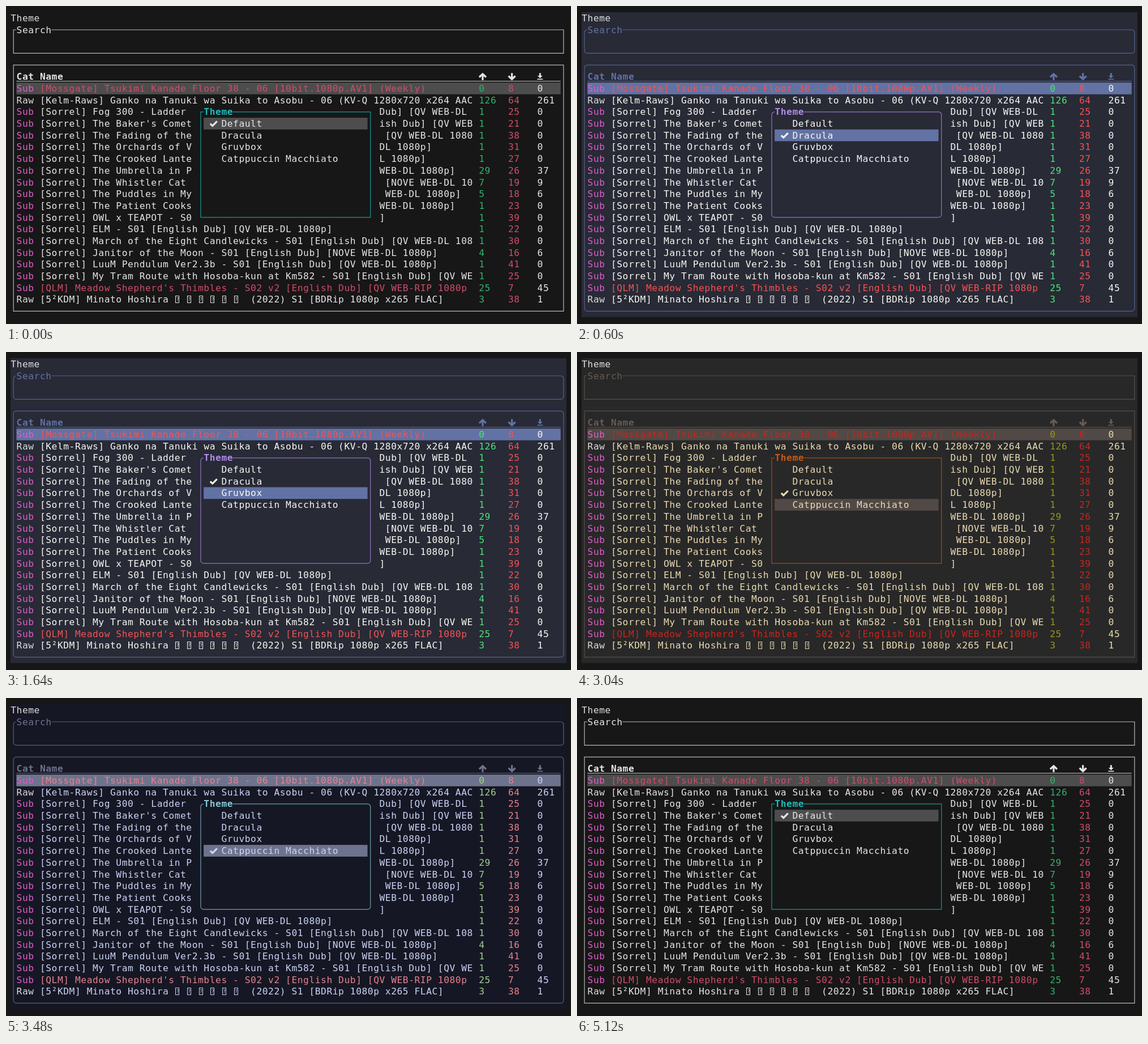
An HTML page with a canvas for the animation above (5.64 s loop, 998x561 px).

```html
<!DOCTYPE html>
<html lang="en">
<head>
<meta charset="utf-8">
<title>Theme</title>
<style>
  html, body { margin: 0; width: 100%; height: 100%; overflow: hidden; background: #171717; }
  canvas { display: block; width: 998px; height: 561px; }
</style>
</head>
<body>
<canvas id="stage" width="998" height="561"></canvas>
<script>
const ctx = document.getElementById('stage').getContext('2d');

// Terminal grid
const LEFT = 8, TOP = 11, CELL_W = 10.337, CELL_H = 20.68, COLS = 95, ROWS = 26;
const FONT = '16.3px "DejaVu Sans Mono", "Noto Sans Mono", monospace';
const LINE_ALPHA = 0.78;
const PAGE = '#171717', PLAIN = '#dddddd', SUB = '#e05ccb';

const THEMES = [
  { name: 'Default', bg: PAGE, fg: '#e6e6e6', border: '#e6e6e6', focus: '#1cbcbc',
    mark: '#4d4d4d', red: '#d04c6b', green: '#31b36d', radius: 0 },
  { name: 'Dracula', bg: '#282a36', fg: '#f8f8f2', border: '#6272a4', focus: '#b08be8',
    mark: '#6272a4', red: '#f55353', green: '#4be576', radius: 5 },
  { name: 'Gruvbox', bg: '#282828', fg: '#ebdbb2', border: '#665c54', focus: '#c9590f',
    mark: '#504945', red: '#cc241d', green: '#98971a', radius: 0 },
  { name: 'Catppuccin Macchiato', bg: '#161724', fg: '#cad3f5', border: '#6e738d', focus: '#84c8d6',
    mark: '#6e738d', red: '#e5828f', green: '#a0d090', radius: 5 },
];

// [start in ms, active theme, highlighted menu entry]
const LOOP = 5640;
const STEPS = [
  [0, 0, 0], [120, 0, 1], [600, 1, 1], [1640, 1, 2], [2080, 2, 2],
  [3040, 2, 3], [3480, 3, 3], [4680, 3, 0], [5120, 0, 0],
];

const NAME_COLS = 74;
const dub = (title, site = 'QV') => `[Sorrel] ${title} - S01 [English Dub] [${site} WEB-DL 1080p]`;
// A name whose middle lies behind the menu
const behind = (start, end) => `[Sorrel] ${start}`.padEnd(58) + end;

// [name, seeders, leechers, downloads, flags]
const ENTRIES = [
  ['[Mossgate] Tsukimi Kanade Floor 38 - 06 [10bit.1080p.AV1] (Weekly)', 0, 8, 0, 'red'],
  ['[Kelm-Raws] Ganko na Tanuki wa Suika to Asobu - 06 (KV-Q 1280x720 x264 AAC', 126, 64, 261, 'raw'],
  [behind('Fog 300 - Ladder', 'Dub] [QV WEB-DL'), 1, 25, 0],
  [behind("The Baker's Comet", 'ish Dub] [QV WEB'), 1, 21, 0],
  [behind('The Fading of the', ' [QV WEB-DL 1080'), 1, 38, 0],
  [behind('The Orchards of V', 'DL 1080p]'), 1, 31, 0],
  [behind('The Crooked Lante', 'L 1080p]'), 1, 27, 0],
  [behind('The Umbrella in P', 'WEB-DL 1080p]'), 29, 26, 37],
  [behind('The Whistler Cat', ' [NOVE WEB-DL 10'), 7, 19, 9],
  [behind('The Puddles in My', ' WEB-DL 1080p]'), 5, 18, 6],
  [behind('The Patient Cooks', 'WEB-DL 1080p]'), 1, 23, 0],
  [behind('OWL x TEAPOT - S0', ']'), 1, 39, 0],
  [dub('ELM'), 1, 22, 0],
  [dub('March of the Eight Candlewicks'), 1, 30, 0],
  [dub('Janitor of the Moon', 'NOVE'), 4, 16, 6],
  [dub('LuuM Pendulum Ver2.3b'), 1, 41, 0],
  [dub('My Tram Route with Hosoba-kun at Km582'), 1, 25, 0],
  ["[QLM] Meadow Shepherd's Thimbles - S02 v2 [English Dub] [QV WEB-RIP 1080p", 25, 7, 45, 'red'],
  ['[5²KDM] Minato Hoshira ' + '\uFFFD '.repeat(6) + ' (2022) S1 [BDRip 1080p x265 FLAC]', 3, 38, 1, 'raw'],
];

const colX = col => LEFT + col * CELL_W;
const rowY = row => TOP + row * CELL_H;

function fillCells(col, row, cols, rows, color) {
  ctx.fillStyle = color;
  ctx.fillRect(colX(col), rowY(row), cols * CELL_W, rows * CELL_H);
}

function missingGlyph(x, y, color) {
  ctx.strokeStyle = color;
  ctx.lineWidth = 1;
  ctx.strokeRect(Math.round(x + 2) + 0.5, Math.round(y + 4) + 0.5, 6, 12);
  ctx.font = '8px "DejaVu Sans Mono", monospace';
  ctx.fillText('?', x + 3.2, y + 13.5);
  ctx.font = FONT;
}

function text(str, col, row, color, bold = false) {
  ctx.font = (bold ? 'bold ' : '') + FONT;
  ctx.fillStyle = color;
  [...String(str)].forEach((ch, i) => {
    const x = colX(col + i);
    if (ch === '\uFFFD') missingGlyph(x, rowY(row), color);
    else if (ch !== ' ') ctx.fillText(ch, x + 0.25, rowY(row) + 16);
  });
}

function box(col, row, lastCol, lastRow, color, radius) {
  ctx.globalAlpha = LINE_ALPHA;
  ctx.strokeStyle = color;
  ctx.lineWidth = 1.2;
  ctx.beginPath();
  ctx.roundRect(colX(col + 0.5), rowY(row + 0.5),
    (lastCol - col) * CELL_W, (lastRow - row) * CELL_H, radius);
  ctx.stroke();
  ctx.globalAlpha = 1;
}

function boxTitle(str, col, row, theme, color, bold) {
  fillCells(col, row, str.length, 1, theme.bg);
  text(str, col, row, color, bold);
}

function polyline(points, color, width) {
  ctx.strokeStyle = color;
  ctx.lineWidth = width;
  ctx.beginPath();
  points.forEach(([x, y]) => ctx.lineTo(x, y));
  ctx.stroke();
}

function arrow(col, row, dir, color) {
  const x = colX(col) + 7, y = rowY(row) + 10.2;
  polyline([[x, y + 6.3 * dir], [x, y - 4 * dir]], color, 3.2);
  polyline([[x - 6, y + 1 * dir], [x, y - 4.6 * dir], [x + 6, y + 1 * dir]], color, 3.4);
}

function downloadIcon(col, row, color) {
  const x = colX(col) + 5, y = rowY(row) + 4;
  ctx.fillStyle = color;
  ctx.fillRect(x - 1.5, y, 3, 5);
  ctx.beginPath();
  ctx.moveTo(x - 4.5, y + 4.5);
  ctx.lineTo(x + 4.5, y + 4.5);
  ctx.lineTo(x, y + 9);
  ctx.fill();
  ctx.fillRect(x - 5, y + 10, 10, 1.6);
}

function check(col, row, color) {
  const x = colX(col) + 0.5, y = rowY(row) + 10.3;
  polyline([[x + 0.8, y + 0.2], [x + 4.8, y + 4], [x + 12.8, y - 4]], color, 3.2);
}

function drawSearch(theme) {
  box(0, 1, COLS - 1, 3, theme.border, theme.radius);
  boxTitle('Search', 1, 1, theme, theme.border);
}

function drawTable(theme) {
  const { border, fg, red, green } = theme;
  box(0, 4, COLS - 1, ROWS - 1, border, theme.radius);
  text('Cat', 1, 5, border, true);
  text('Name', 5, 5, border, true);
  arrow(80, 5, 1, border);
  arrow(85, 5, -1, border);
  downloadIcon(90, 5, border);
  ctx.globalAlpha = LINE_ALPHA;
  ctx.fillRect(colX(1), 132, 93 * CELL_W, 1.2);
  ctx.globalAlpha = 1;

  fillCells(1, 6, 93, 1, theme.mark);
  ENTRIES.forEach(([name, up, down, done, flag], i) => {
    const row = 6 + i, raw = flag === 'raw';
    text(raw ? 'Raw' : 'Sub', 1, row, raw ? PLAIN : SUB);
    text(name.slice(0, NAME_COLS), 5, row, flag === 'red' ? red : fg);
    text(up, 80, row, green);
    text(down, 85, row, red);
    text(done, 90, row, fg);
  });
}

function drawMenu(theme, selected) {
  fillCells(31, 8, 32, 10, theme.bg);
  box(32, 8, 61, 17, theme.focus, theme.radius);
  boxTitle('Theme', 33, 8, theme, theme.focus, true);
  fillCells(33, 9 + selected, 28, 1, theme.mark);
  THEMES.forEach((entry, i) => {
    text(entry.name, 36, 9 + i, theme.fg);
    if (entry === theme) check(34, 9 + i, theme.fg);
  });
}

function draw(time) {
  const [, active, selected] = STEPS.findLast(([start]) => start <= time);
  const theme = THEMES[active];
  ctx.fillStyle = PAGE;
  ctx.fillRect(0, 0, 998, 561);
  fillCells(0, 0, COLS, ROWS, theme.bg);
  text('Theme', 0, 0, PLAIN);
  drawSearch(theme);
  drawTable(theme);
  drawMenu(theme, selected);
}

const begin = performance.now();
function tick() {
  draw((performance.now() - begin) % LOOP);
  requestAnimationFrame(tick);
}
tick();
</script>
</body>
</html>
```
